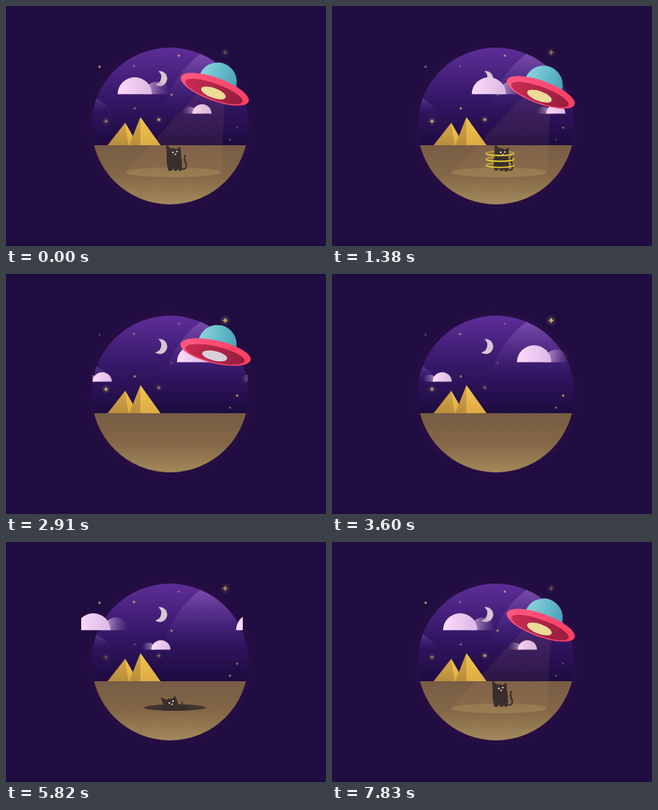
An HTML page with a canvas for the animation above (7860 ms loop, 400x300 px).

```html
<!DOCTYPE html>
<html lang="en">
<head>
<meta charset="utf-8">
<title>Desert abduction</title>
<style>
html, body { margin: 0; width: 100%; height: 100%; overflow: hidden; background: #1f0c40; }
canvas { display: block; }
</style>
</head>
<body>
<canvas id="stage" width="400" height="300"></canvas>
<script>
const c = document.getElementById('stage').getContext('2d');
const LOOP = 7860, TAU = Math.PI * 2;

const clamp = v => Math.max(0, Math.min(1, v));
const mix = (a, b, k) => a + (b - a) * k;
const rad = deg => deg * Math.PI / 180;

// Eased 0 to 1 between two times.
function ramp(t, from, to) {
  const v = clamp((t - from) / (to - from));
  return v * v * (3 - 2 * v);
}

function grad(x0, y0, x1, y1, ...colors) {
  const g = c.createLinearGradient(x0, y0, x1, y1);
  colors.forEach((col, i) => g.addColorStop(i / (colors.length - 1), col));
  return g;
}

function glow(r0, r1, color) {
  const g = c.createRadialGradient(0, 0, r0, 0, 0, r1);
  g.addColorStop(0, `rgba(${color})`);
  g.addColorStop(1, `rgba(${color.replace(/[^,]+$/, '0')})`);
  return g;
}

function shape(d, fill) {
  c.fillStyle = fill;
  c.fill(new Path2D(d));
}

function oval(x, y, rx, ry, fill, from = 0, to = TAU) {
  c.beginPath();
  c.ellipse(x, y, rx, ry, 0, from, to);
  c.fillStyle = fill;
  c.fill();
}

function layer(x, y, draw) {
  c.save();
  c.translate(x, y);
  draw();
  c.restore();
}

function backdrop() {
  c.fillStyle = '#1f0c40';
  c.fillRect(0, 0, 400, 300);
  layer(205, 150, () => {
    oval(0, 0, 114, 114, glow(96, 114, '58,20,76,.25'));
    c.beginPath();
    c.arc(0, 0, 98, 0, TAU);
    c.clip();
    c.translate(-205, -150);
    c.fillStyle = grad(0, 52, 0, 174, '#5e2e98', '#361869', '#1d0b3f');
    c.fillRect(100, 50, 210, 125);
    shape('M198 122Q213 82 243 60L310 50V140H198Z',
      grad(0, 58, 0, 128, 'rgba(140,95,185,.65)', 'rgba(80,40,135,0)'));
    shape('M104 111Q121 117 134 134H104Z',
      grad(0, 113, 0, 134, 'rgba(112,70,170,.75)', 'rgba(70,35,125,0)'));
    c.fillStyle = grad(0, 174, 0, 248, '#785d45', '#836747', '#a3895a');
    c.fillRect(100, 174, 210, 80);
  });
}

const stars = [[274, 58], [125, 144], [191, 142], [117, 76], [160, 75],
  [289, 152], [161, 128], [216, 62], [207, 111], [280, 167]];

// Listed from the largest to the smallest.
function sky(t) {
  stars.forEach(([x, y], i) => layer(x, y, () => {
    const r = 1.4 + 2.4 / (1 + i * .5);
    c.globalAlpha = .5 - .25 * Math.cos(TAU * t / LOOP + i * 1.3);
    if (i < 3) oval(0, 0, r * 2, r * 2, glow(0, r * 2, '245,210,100,.35'));
    c.scale(r, r);
    shape('M0-1Q.2-.2 1 0Q.2 .2 0 1Q-.2 .2-1 0Q-.2-.2 0-1Z', '#f3d474');
  }));
  shape('M190.5 81.5A9.3 9.3 0 1 1 186.5 98A9.3 9.3 0 0 0 190.5 81.5Z', '#d5c8d3');
}

function pyramid(x, y, left, right, ridge) {
  shape(`M${x} ${y}L${left} 174H${right}Z`, grad(0, y, 0, 174, '#d6a645', '#b98d3d'));
  shape(`M${x} ${y}L${ridge} 174H${right}Z`, grad(0, y, 0, 174, '#f0c452', '#deab44'));
}

// One full lobe and one that fades out, drifting through a window.
function cloud(t, x, base, r, side, left, right, span) {
  layer(0, 0, () => {
    c.beginPath();
    c.rect(left, base - 30, right - left, 30);
    c.clip();
    for (const wrap of [0, span]) {
      const px = x + t / LOOP * span - wrap, r2 = r * .75, px2 = px + side * r * 1.3;
      oval(px2, base, r2, r2,
        grad(px2 - side * r2, 0, px2 + side * r2, 0, 'rgba(215,185,225,.9)', 'rgba(150,115,180,0)'), Math.PI, TAU);
      oval(px, base, r, r, grad(px - r, 0, px + r, 0, '#fddcfa', '#dbb7e5'), Math.PI, TAU);
    }
  });
}

function beam({ x, y }, light) {
  c.globalAlpha = light;
  shape(`M${x - 17} ${y}L149 208A60 6 0 0 0 269 208L${x + 13} ${y}Z`,
    grad(0, 108, 0, 212, 'rgba(200,120,110,.1)', 'rgba(225,180,125,.07)'));
  oval(209, 208, 60, 6, 'rgba(170,142,90,.45)');
  c.globalAlpha = 1;
}

// Hover, lift a little, shrink away; later grow back from the distance.
function flight(t) {
  const hover = 106 - 2 * Math.cos(TAU * 3 * t / LOOP);
  if (t > 5000) {
    const s = ramp(t, 6750, 7500) ** 2;
    return { x: mix(144, 261, s), y: mix(127, hover, s), s, tilt: mix(-15, 20, s) };
  }
  const lift = ramp(t, 2450, 2910), away = ramp(t, 2910, 3500);
  return { x: 261 + lift - 60 * away, y: hover - 7 * lift - 8 * away, s: 1 - away, tilt: 20 - 7 * lift - 20 * away };
}

function saucer({ x, y, s, tilt }, light) {
  if (s < .01) return;
  layer(x, y, () => {
    c.rotate(rad(tilt));
    c.scale(s, s);
    oval(0, -10, 24, 24, grad(-24, 0, 24, 0, '#8ad2dc', '#66bccb', '#4b9fb5'));
    oval(0, 0, 45, 14.4, grad(-45, 0, 45, 0, '#ff5880', '#fa3f63'));
    oval(0, 3, 38, 10, grad(-38, 0, 38, 0, '#c92c52', '#961c3c'));
    oval(0, 5, 16, 6, '#d9d1d8');
    c.globalAlpha = light;
    oval(0, 5, 16, 6, '#ecdc97');
  });
}

function cat(lean, wag) {
  c.rotate(rad(lean));
  c.strokeStyle = '#3a2e2d';
  c.lineWidth = 2;
  c.lineCap = 'round';
  c.stroke(new Path2D(`M8-3Q17 0 ${15 + wag / 2}-9Q${12 + wag}-14 ${14 + wag}-19`));
  shape('M-7 0Q-10-10-9-19L-10-33L-4-28Q0-29 3-27L8-30L9-18Q11-8 9 0Q6 1 5-2L3 0H0L-1-3L-3 0Z', '#3a2e2d');
  oval(-1.5, -23, 1.1, 1.1, '#e6e0e4');
  oval(3.5, -24, 1.1, 1.1, '#e6e0e4');
  oval(1.5, -20.5, 1.3, .9, '#d8b5aa');
}

function rings(t, alpha, from) {
  c.globalAlpha = alpha;
  c.strokeStyle = '#e6cf30';
  c.lineWidth = 1.6;
  for (let i = 1; i < 4; i++) {
    c.beginPath();
    c.ellipse(0, -7 * i + .7 * Math.sin(t / 95 + i), 17.5, 2.6, 0, from, from + Math.PI);
    c.stroke();
  }
  c.globalAlpha = 1;
}

function abduction(t) {
  const lift = ramp(t, 1600, 2400), held = ramp(t, 850, 1100) * (1 - ramp(t, 2250, 2400));
  const sway = Math.sin(TAU * t / 800);
  layer(mix(210, 259, lift), mix(206, 113, lift), () => {
    c.scale(1 - lift, 1 - lift);
    rings(t, held * .6, Math.PI);
    layer(0, 0, () => cat(-6 * held * sway, sway));
    rings(t, held, 0);
  });
}

function comeback(t) {
  const peek = ramp(t, 5000, 5500), jump = clamp((t - 6000) / 450);
  const look = ramp(t, 6450, 6900) * (1 - ramp(t, 7250, 7600));
  layer(0, 0, () => {
    if (jump < .5) {
      c.beginPath();
      c.rect(172, 120, 78, 87);
      c.ellipse(211, 207, 39, 4, 0, 0, Math.PI);
      c.clip();
    }
    c.translate(212 - 2 * jump, 248 - 25 * peek - 17 * jump - 28 * Math.sin(Math.PI * jump));
    cat(-16 * peek * (1 - jump) - 7 * look, 4 * look);
  });
}

function frame(now) {
  const t = now % LOOP, ship = flight(t);
  const light = t < 5000 ? 1 - ramp(t, 2450, 2750) : ramp(t, 7500, 7780);
  const hole = ramp(t, 3800, 4200) * (1 - ramp(t, 6400, 6700));
  backdrop();
  sky(t);
  cloud(t, 161, 110.5, 21.5, 1, 94, 296, 200);
  cloud(t, 245, 134.7, 12, -1, 108, 302, 198);
  pyramid(149, 146, 127, 165, 153);
  pyramid(168, 139, 154, 193, 168);
  beam(ship, light);
  oval(211, 207, 39 * hole, 4 * hole, grad(172, 0, 250, 0, '#493932', '#33292a', '#493932'));
  if (t < 2400) abduction(t);
  if (t > 5000) comeback(t);
  saucer(ship, light);
  requestAnimationFrame(frame);
}
requestAnimationFrame(frame);
</script>
</body>
</html>
```
